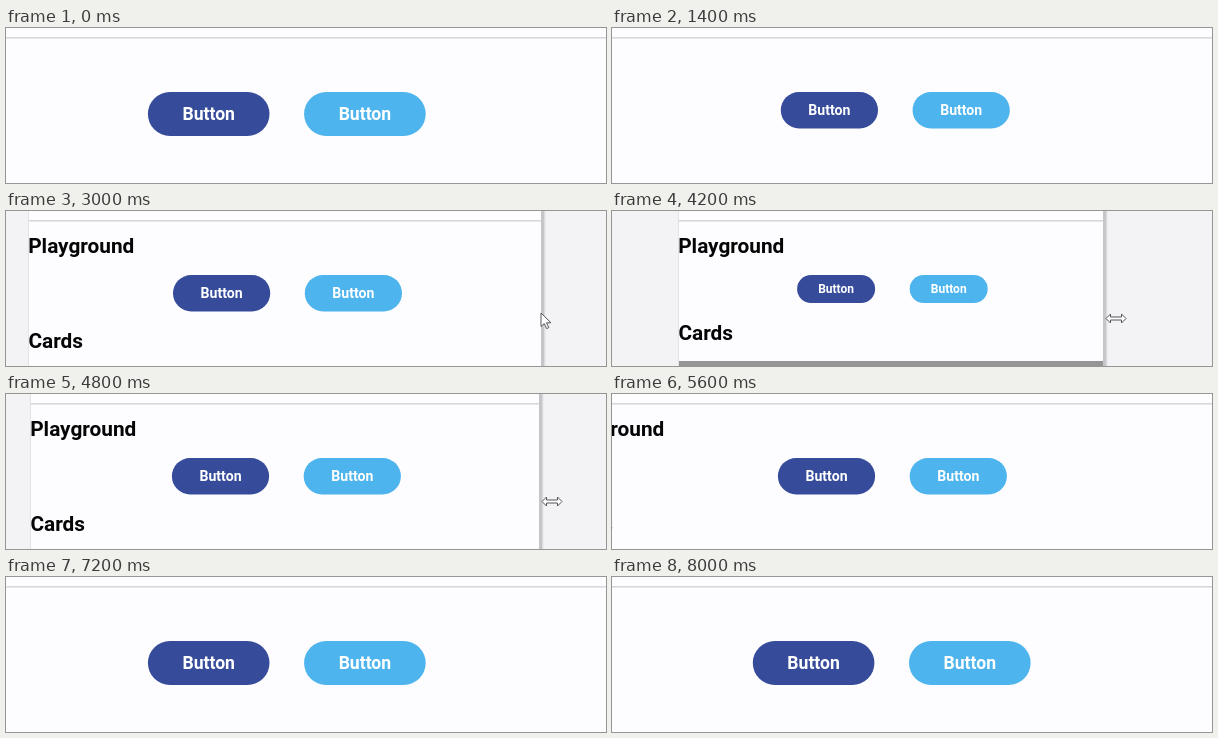
An HTML page for the animation above (8.2 s loop, 600x155 px).

```html
<!DOCTYPE html>
<html lang="en">
<head>
<meta charset="utf-8">
<title>Responsive buttons</title>
<style>
  html, body { margin: 0; width: 100%; height: 100%; overflow: hidden; background: #fdfcfe; }
  svg { display: block; width: 600px; height: 155px; }
  text { font-family: Roboto, Arial, sans-serif; font-weight: 700; }
  .heading { font-size: 20.8px; fill: #050506; }
  .label { fill: #fff; text-anchor: middle; }
  .cursor { fill: #fff; stroke: #55555a; stroke-width: 1; stroke-linejoin: round; }
</style>
</head>
<body>
<svg viewBox="0 0 600 155">
  <rect width="600" height="155" fill="#f3f2f5"/>
  <rect id="shade" y="0" height="155" fill="#e3e2e6"/>
  <rect id="page" y="0" height="155" fill="#fdfcfe"/>
  <rect id="rule" y="9" height="1.6" fill="#d9d7de"/>
  <text id="playground" class="heading" y="42">Playground</text>
  <text id="cards" class="heading">Cards</text>
  <rect id="cardTop" y="150" height="5" fill="#959595"/>
  <rect id="edge" y="0" width="3.2" height="155" fill="#c6c5c9"/>
  <g id="dark"><rect y="64" fill="#364c9b"/><text class="label">Button</text></g>
  <g id="light"><rect y="64" fill="#4db4ed"/><text class="label">Button</text></g>
  <path id="arrow" class="cursor" d="M0 0V13.5L3.2 10.6L5.6 15.6L7.8 14.6L5.5 9.8H10Z"/>
  <path id="resize" class="cursor" d="M-10 0L-5.5 -4.5V-1.5H5.5V-4.5L10 0L5.5 4.5V1.5H-5.5V4.5Z"/>
</svg>
<script>
const LOOP = 8200, STEP = 200, GAP = 34.6;
const TURN = 3900; // the drag changes direction here

// [ms, x]
const leftPath = [[0, -200], [1200, -156], [2400, -36], [3000, 23], [3600, 64], [3900, 74],
  [4200, 67], [4800, 25], [5600, -53], [6200, -112], [7200, -200]];
const centerPath = [[0, 280.8], [600, 281.2], [1200, 283.2], [1400, 283.3], [3000, 281.5],
  [4200, 280.4], [5600, 280.4], [7200, 280.8], [8000, 279.7]];

const sizes = {
  large: { w: 121.6, h: 44, font: 17.6, base: 92.4 },
  medium: { w: 97.2, h: 36.4, font: 14.1, base: 87.3 },
  small: { w: 78, h: 28, font: 12, base: 82.3 }
};

const $ = id => document.getElementById(id);

function set(el, attrs) {
  for (const key in attrs) el.setAttribute(key, attrs[key]);
}

function along(path, t) {
  const i = path.findIndex(p => p[0] > t);
  if (i < 0) return path[path.length - 1][1];
  const [t0, a] = path[i - 1], [t1, b] = path[i];
  return a + (b - a) * (t - t0) / (t1 - t0);
}

function drawButton(id, x, { w, h, font, base }) {
  const [box, label] = $(id).children;
  set(box, { x, width: w, height: h, rx: h / 2 });
  set(label, { x: x + w / 2, y: base, 'font-size': font });
}

function place(id, x, y, visible) {
  set($(id), { transform: `translate(${x} ${y})`, visibility: visible ? 'visible' : 'hidden' });
}

function draw(t) {
  const left = along(leftPath, t), right = 559 - left, width = right - left;
  const center = along(centerPath, t);
  const size = left < -146 ? sizes.large : left < 36 ? sizes.medium : sizes.small;
  const isSmall = size === sizes.small;

  set($('shade'), { x: left - 1, width: width + 4.5 });
  for (const id of ['page', 'rule']) set($(id), { x: left, width });
  set($('edge'), { x: right - 1 });
  set($('playground'), { x: left - 0.8 });
  set($('cards'), { x: left - 0.6, y: isSmall ? 128.5 : 137 });
  set($('cardTop'), { x: left, width: width + 2, visibility: isSmall ? 'visible' : 'hidden' });

  drawButton('dark', center - GAP / 2 - size.w, size);
  drawButton('light', center + GAP / 2, size);

  place('arrow', right - 1, 102, t < TURN);
  place('resize', right + 12, 107.5, t >= TURN);
}

const start = performance.now();
function tick() {
  const t = (performance.now() - start) % LOOP;
  draw(Math.floor(t / STEP) * STEP);
  requestAnimationFrame(tick);
}
tick();
</script>
</body>
</html>
```
